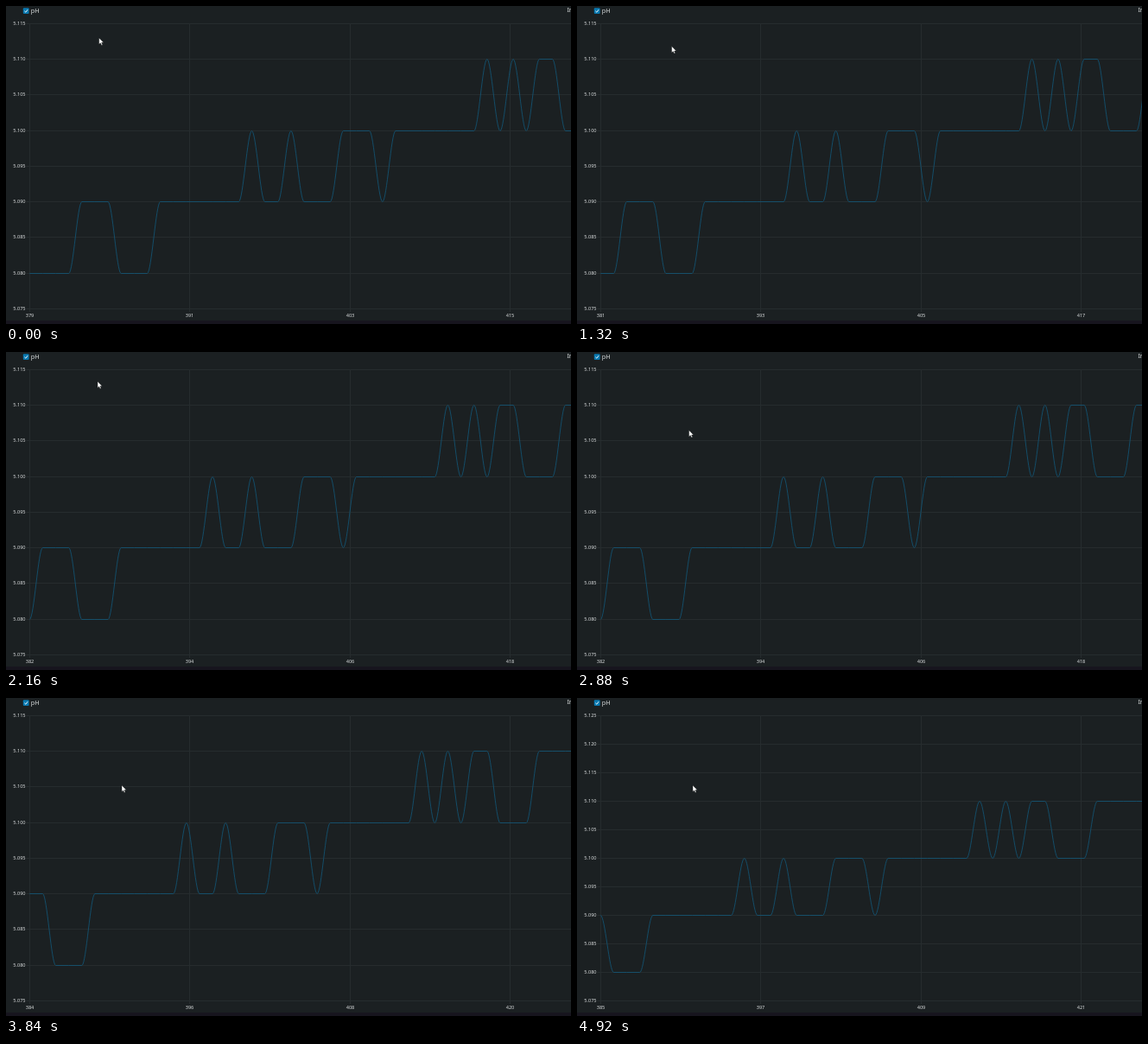
Write an HTML page that moves like this. It is 654x368 px and loops after 5400 ms.

```html
<!DOCTYPE html>
<html lang="en">
<head>
<meta charset="utf-8">
<title>pH chart</title>
<style>
  html, body { margin: 0; width: 100%; height: 100%; overflow: hidden; background: #1b2022; }
  svg { display: block; width: 654px; height: 368px; }
  text { font-family: "Noto Sans", "Open Sans", sans-serif; fill: #d6d9da; }
  .axis text { font-size: 5.65px; }
  .head { font-size: 7.3px; }
  .grid { stroke: #262c2e; stroke-width: 1; fill: none; }
  .curve { stroke: #12587a; stroke-width: .8; fill: none; stroke-linejoin: round; }
</style>
</head>
<body>
<svg viewBox="0 0 654 368">
  <defs><clipPath id="plot"><rect x="27" y="15" width="627" height="340"/></clipPath></defs>
  <rect width="654" height="368" fill="#1b2022"/>
  <rect y="364" width="654" height="4" fill="#17151e"/>
  <path id="grid" class="grid"/>
  <g id="yAxis" class="axis" text-anchor="end"></g>
  <g id="xAxis" class="axis" text-anchor="middle"></g>
  <g clip-path="url(#plot)"><path id="curve" class="curve"/></g>
  <rect x="19.8" y="2.3" width="6.8" height="6.8" rx="1" fill="#0878b0"/>
  <path d="M21.4 5.8 L22.8 7.2 L25.1 4.2" fill="none" stroke="#eef6fa" stroke-width="1"/>
  <text class="head" x="28.8" y="7.9">pH</text>
  <text class="head" x="649.4" y="7.4">Int</text>
  <path id="cursor" d="M0 0 V7.4 L1.7 5.9 L2.9 8.5 L4.1 8 L3 5.4 H5.3 Z" fill="#fff" stroke="#101314" stroke-width=".4"/>
</svg>
<script>
const LOOP = 5400, TICK = 120;
const LEFT = 27.3, TOP = 20.3, BOTTOM = 350.3, STEP = 15.13, COLUMN = 185.4;
const SHIFT_START = 510, SHIFT_EVERY = 805, RESCALE = 4560;
const MIN = 5.075, ROW = 0.005;

// Bumps of one level on a rising baseline, as [first sample, length]
const bumps = [[4, 3], [17, 1], [20, 1], [24, 3], [35, 1], [37, 1], [39, 2], [44, 8]];
const baseline = i => 8 + (i >= 10) + (i >= 28);
const inBump = i => bumps.some(([first, n]) => i >= first && i < first + n);
const samples = Array.from({ length: 52 }, (_, i) => 5 + (baseline(i) + inBump(i)) / 100);

// Pointer path: time, x, y
const path = [[0, 107.7, 36.9], [1200, 107.7, 36.9], [1320, 109.6, 46.6],
  [2160, 106, 34], [2520, 106, 34], [3000, 134, 101], [LOOP, 134, 101]];

const $ = id => document.getElementById(id);
const label = (x, y, s) => `<text x="${x}" y="${y}">${s}</text>`;
const crisp = v => Math.floor(v) + 0.5;
const ease = u => u * u * (3 - 2 * u);

const scaleTo = max => v => crisp(BOTTOM - (v - MIN) / (max - MIN) * (BOTTOM - TOP));

function drawAxes(shift, max, scale) {
  let grid = "", yText = "", xText = "";
  const rows = Math.round((max - MIN) / ROW);
  for (let i = 0; i <= rows; i++) {
    const v = MIN + i * ROW, y = scale(v);
    grid += `M23.5 ${y}H654`;
    yText += label(22.6, y + 1.5, v.toFixed(3));
  }
  for (let i = 0; i < 4; i++) {
    const x = crisp(LEFT + i * COLUMN);
    grid += `M${x} ${TOP}V354`;
    xText += label(x, 360, 379 + shift + i * 12);
  }
  $("grid").setAttribute("d", grid);
  $("yAxis").innerHTML = yText;
  $("xAxis").innerHTML = xText;
}

// Every sample has a level tangent, so each segment is a simple S-curve
function drawCurve(shift, scale) {
  const ys = samples.slice(shift).map(scale);
  const d = ys.map((y, i) => {
    const x = LEFT + i * STEP;
    return i ? `C${x - STEP * 2 / 3} ${ys[i - 1]} ${x - STEP / 3} ${y} ${x} ${y}` : `M${x} ${y}`;
  });
  $("curve").setAttribute("d", d.join(""));
}

function moveCursor(t) {
  const next = path.findIndex(p => p[0] > t);
  const [t0, x0, y0] = path[next - 1], [t1, x1, y1] = path[next];
  const u = ease((t - t0) / (t1 - t0));
  $("cursor").setAttribute("transform", `translate(${x0 + (x1 - x0) * u} ${y0 + (y1 - y0) * u})`);
}

let drawn = "";
function render(ms) {
  const t = Math.floor(ms % LOOP / TICK) * TICK;
  const shift = Math.min(6, Math.max(0, Math.floor((t - SHIFT_START) / SHIFT_EVERY) + 1));
  const max = t >= RESCALE ? 5.125 : 5.115;
  const key = shift + "/" + max;
  if (key !== drawn) {
    const scale = scaleTo(max);
    drawAxes(shift, max, scale);
    drawCurve(shift, scale);
    drawn = key;
  }
  moveCursor(t);
}

const start = performance.now();
function frame() {
  render(performance.now() - start);
  requestAnimationFrame(frame);
}
frame();
</script>
</body>
</html>
```
